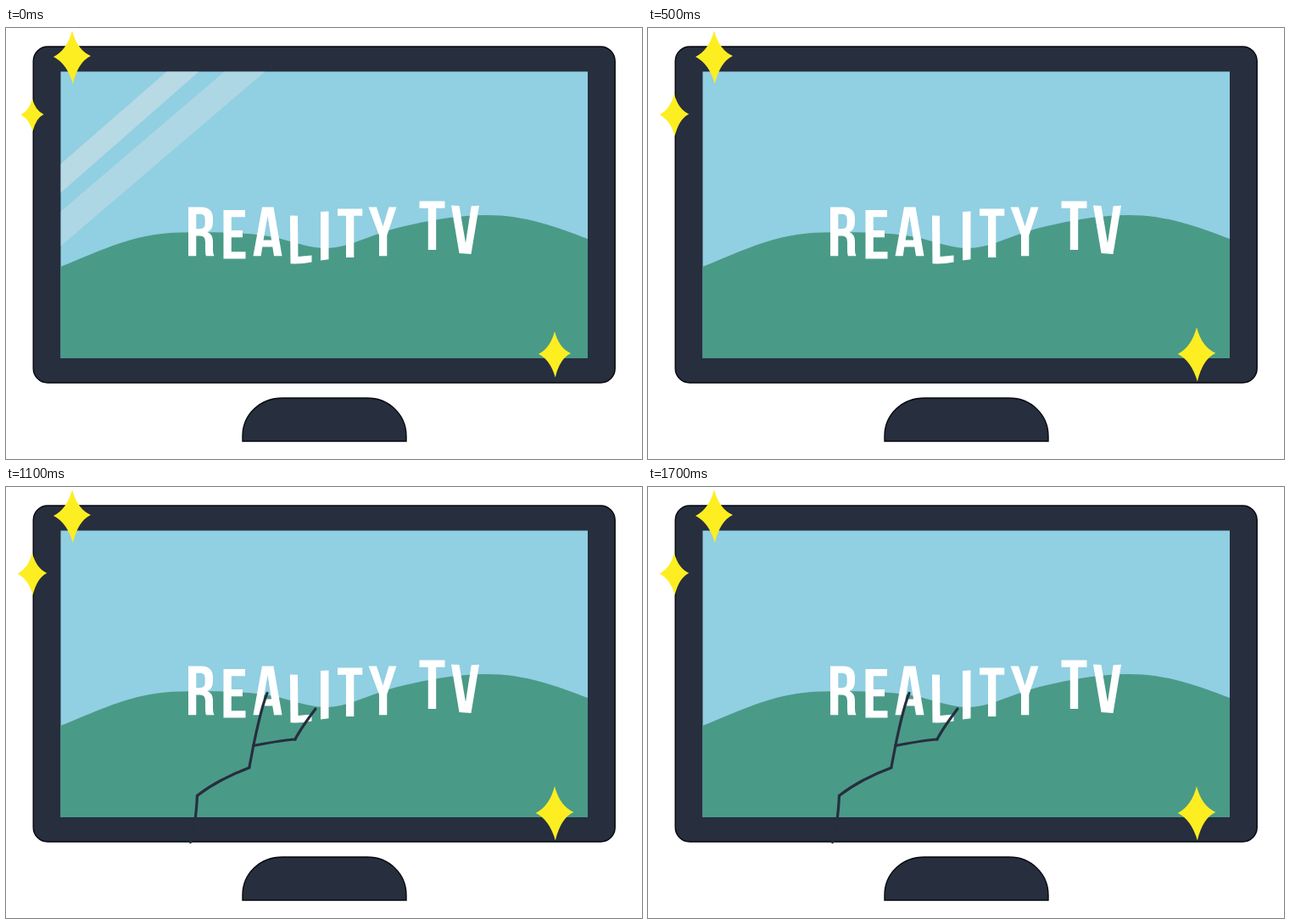
An HTML page for the animation above (1800 ms loop, 750 by 509 pixels).

```html
<!DOCTYPE html>
<html lang="en">
<head>
<meta charset="utf-8">
<title>Reality TV</title>
<style>
  html, body { margin: 0; width: 100%; height: 100%; overflow: hidden; background: #fff; }
  svg { display: block; width: 750px; height: 509px; }
  .body { fill: #272e3e; stroke: #05070c; stroke-width: 1.4; }
  .crack { fill: none; stroke: #272e3e; stroke-width: 3.2; stroke-linecap: round; stroke-linejoin: round; }
</style>
</head>
<body>
<svg viewBox="0 0 750 509" role="img" aria-label="REALITY TV">
  <defs>
    <clipPath id="screen"><rect x="64.5" y="51.5" width="621.5" height="338.5"/></clipPath>
    <path id="spark" d="M0-31Q6-8 22-1Q7 6 .8 32Q-6 8-22 0Q-6-8 0-31Z"/>
  </defs>

  <rect class="body" x="32.2" y="22" width="686" height="397" rx="17"/>
  <path class="body" d="M279 488V482C279 456 300 437 326 437H426C452 437 472 457 472 482V488Z"/>

  <g clip-path="url(#screen)">
    <rect x="64" y="51" width="623" height="340" fill="#91cfe2"/>
    <path fill="#4a9a88" d="M64 282C110 264 150 242 207 241.500C250 241 290 241 320 248C345 254 358 260 378 260C405 260 430 243 470 234C505 226 535 221 567 221C612 221 650 235 687 249.500V391H64Z"/>
    <g id="glare" fill="#e6e6e6"><path/><path/></g>
  </g>

  <!-- Warped lettering, one outline per letter -->
  <g fill="#fff" fill-rule="evenodd">
    <path d="M215 211.500H230Q244 211.500 244 225V229Q244 238.500 237.500 241Q244 243.500 244 252V262Q244 267 245.500 269.300H236Q235 267 235 261V252.500Q235 245.500 229 245.500H224.300V269.300H215ZM224.300 219.800V237.200H228.500Q234.700 237.200 234.700 231V226Q234.700 219.800 229.500 219.800Z"/>
    <path d="M256.500 215H282V223.300H265.800V239H279V247.300H265.800V264.300H282.500V272.600H256.500Z"/>
    <path d="M302 211.500H315.500L325.500 269.300H316L314.300 258.500H302.300L300.700 269.300H291.500ZM308.500 222L303.600 250.500H313.100Z"/>
    <path d="M335 221.500L344 221.800L344.500 270L360.500 268.500V276.500Q348 279 335.500 278.300Z"/>
    <path d="M371 217L380.500 216.500V273.200L371 274.500Z"/>
    <path d="M391 213.500H420.300V221.800H410.300V271H401V221.800H391Z"/>
    <path d="M427.500 211.500H437L444.500 234.500L451.500 211.500H460.500L449.300 245V269.300H440V245Z"/>
    <path d="M487.500 204.500H517.500V212.800H507.200V262H497.800V212.800H487.500Z"/>
    <path d="M525 209.500L534.500 210L542 254L548.700 210.300L558 209.800L548.500 267L534.500 266Z"/>
  </g>

  <g id="crack" class="crack">
    <path d="M217.500 419.500C222 405 224.500 385 225.500 364.500"/>
    <path d="M225.500 364.500C243 351 264 340 287 331.500"/>
    <path d="M287 330.500L291.800 305.500"/>
    <path d="M291.800 305.500C296 285 302 258 308 243.500"/>
    <path d="M291.800 305.500C308 302.500 325 299 341 298"/>
    <path d="M341 298C347 286 356 274 365 262"/>
  </g>

  <g id="sparks" fill="#fdee21"><use href="#spark"/><use href="#spark"/><use href="#spark"/></g>
</svg>

<script>
const STEP = 100, STEPS = 18, CYCLE = 6, CRACK_START = 6;
const kids = id => [...document.getElementById(id).children];
const glare = kids('glare'), crack = kids('crack'), sparks = kids('sparks');

// Position and half width of each spark through one cycle
const twinkle = [
  { x: 78, y: 34, w: [22, 22, 19.5, 17, 19.5, 22] },
  { x: 31, y: 102.5, w: [13.5, 10.7, 13, 15, 16.2, 17.3] },
  { x: 647, y: 385, w: [19, 15.7, 13, 15.7, 19, 22.3] }
];

// Bands as [top x1, top x2, left y1, left y2, opacity]
const near = [190, 228, 161, 195, .45];
const next = [201, 243, 175, 209, .45];
const mid = [230, 274, 195, 233, .39];
const far = [258, 306, 217, 258, .32];
const faint = [337, 376, 285, 328, .16];
const bands = [[near, far], [next, faint], [mid], [far], [faint], []];

function draw(step) {
  const phase = step % CYCLE;
  sparks.forEach((el, i) => {
    const { x, y, w } = twinkle[i];
    el.setAttribute('transform', `translate(${x} ${y}) scale(${w[phase] / 22})`);
  });
  glare.forEach((el, i) => {
    const b = bands[phase][i];
    el.setAttribute('d', b ? `M${b[0]} 51H${b[1]}L64 ${b[3]}V${b[2]}Z` : '');
    el.setAttribute('opacity', b ? b[4] : 0);
  });
  crack.forEach((el, i) => {
    el.style.display = step >= CRACK_START + i ? '' : 'none';
  });
}

const start = performance.now();
function tick(now) {
  draw(Math.floor(Math.max(0, now - start) / STEP) % STEPS);
  requestAnimationFrame(tick);
}
draw(0);
requestAnimationFrame(tick);
</script>
</body>
</html>
```
